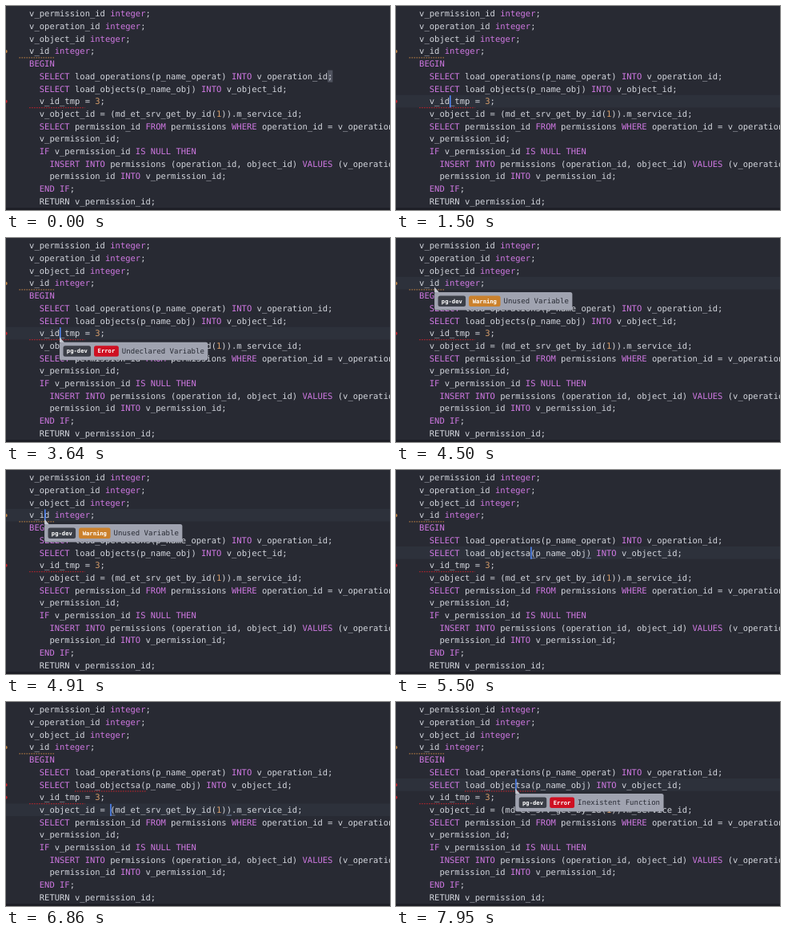
Animation of 480 by 256 pixels, one loop 8 s. Source, as an HTML page:

```html
<!DOCTYPE html>
<html lang="en">
<head>
<meta charset="utf-8">
<title>SQL linter</title>
<style>
html, body { margin: 0; width: 100%; height: 100%; overflow: hidden; background: #282a33; }
svg { display: block; width: 480px; height: 256px; }
text { font-family: "DejaVu Sans Mono", Menlo, monospace; text-rendering: geometricPrecision; }
.code { font-size: 10.5px; fill: #d3d6dd; }
.code .kw { fill: #cf78e2; }
.code .num { fill: #d69d69; }
.badge { font-size: 7.2px; font-weight: bold; fill: #fff; }
.message { font-size: 9px; fill: #292c35; }
.squiggle { fill: none; stroke-width: 1; stroke-dasharray: 1.6 1.4; }
</style>
</head>
<body>
<svg viewBox="0 0 480 256" xmlns="http://www.w3.org/2000/svg">
  <rect width="480" height="256" fill="#282a33"/>
  <rect id="activeLine" width="480" height="15.7" fill="#2d313b"/>
  <rect id="selection" width="6.3" height="15" fill="#50535f"/>
  <g id="code"></g>
  <g id="marks"></g>
  <path id="brackets" stroke="#6f7f9f" stroke-width="1"/>
  <rect id="caret" width="1.5" height="15.2" fill="#528bff"/>
  <rect y="253.3" width="480" height="2.7" fill="#1d1e25"/>
  <g id="bubbles"></g>
</svg>
<script>
const LOOP = 8000, LEFT = 29.1, CHAR = 6.321, PITCH = 15.7, TOP = 1.8;
const RED = '#c8232c', ORANGE = '#c48644';
const TYPED_AT = 5350, LINTED_AT = 6720;

const lines = [
  'v_permission_id integer;',
  'v_operation_id integer;',
  'v_object_id integer;',
  'v_id integer;',
  'BEGIN',
  '  SELECT load_operations(p_name_operat) INTO v_operation_id;',
  '  SELECT load_objects(p_name_obj) INTO v_object_id;',
  '  v_id_tmp = 3;',
  '  v_object_id = (md_et_srv_get_by_id(1)).m_service_id;',
  '  SELECT permission_id FROM permissions WHERE operation_id = v_operation_id',
  '  v_permission_id;',
  '  IF v_permission_id IS NULL THEN',
  '    INSERT INTO permissions (operation_id, object_id) VALUES (v_operation_id',
  '    permission_id INTO v_permission_id;',
  '  END IF;',
  '  RETURN v_permission_id;'
];

// Caret stops: start time, row, column, matching bracket columns
const stops = [
  { at: -500, row: 5, col: 60, selected: true },
  { at: 1200, row: 7, col: 6 },
  { at: 3800, row: 3, col: 3 },
  { at: 5150, row: 6, col: 21, pair: [21, 32] },
  { at: TYPED_AT, row: 6, col: 22, pair: [22, 33] },
  { at: 6500, row: 8, col: 16, pair: [16, 39] },
  { at: 7500, row: 6, col: 19 }
];

const bubbles = [
  { from: 2800, to: 3800, row: 7, col: 6, level: 'Error', text: 'Undeclared Variable' },
  { from: 4050, to: 5150, row: 3, col: 3, level: 'Warning', text: 'Unused Variable' },
  { from: 7580, to: LOOP, row: 6, col: 19, level: 'Error', text: 'Inexistent Function' }
];

const $ = id => document.getElementById(id);
const xOf = col => LEFT + col * CHAR;
const yOf = row => TOP + row * PITCH;
const show = (el, on) => el.setAttribute('visibility', on ? 'visible' : 'hidden');
const place = (el, x, y) => { el.setAttribute('x', x); el.setAttribute('y', y); };

const keywords = /\b(integer|BEGIN|SELECT|INTO|FROM|WHERE|IF|IS|NULL|THEN|INSERT|VALUES|END)\b/g;
const paint = source => source.trim()
  .replace(/\b\d+\b/g, '<tspan class="num">$&</tspan>')
  .replace(keywords, '<tspan class="kw">$&</tspan>');

$('code').innerHTML = lines.map((line, row) =>
  `<text class="code" x="${xOf(line.search(/\S/))}" y="${yOf(row) + 11.5}">${paint(line)}</text>`).join('');
const callLine = $('code').children[6];
const callBefore = paint(lines[6]);
const callAfter = paint(lines[6].replace('objects', 'objectsa'));

function mark(row, from, to, color) {
  const y = yOf(row) + 16;
  return `<g><circle cx="-.3" cy="${yOf(row) + 8.1}" r="2" fill="${color}"/>
    <path class="squiggle" stroke="${color}" d="M${xOf(from)} ${y}H${xOf(to)}"/></g>`;
}
$('marks').innerHTML = mark(3, -2, 5, ORANGE) + mark(7, 0, 11, RED) + mark(6, 9, 23, RED);
const callMark = $('marks').lastElementChild;

function bubble({ row, col, level, text }) {
  const levelWidth = level.length * 4.33 + 9.2;
  const textX = 43 + levelWidth + 4;
  const width = textX + text.length * 5.42 + 4.5;
  const color = level === 'Error' ? '#cf1022' : '#cb812c';
  return `<g transform="translate(${xOf(col)} ${yOf(row) + 19})">
    <path d="M0 -6.5L6 .5H0Z" fill="#c4c7d0"/>
    <rect width="${width}" height="22.5" rx="2.5" fill="#a0a3b0"/>
    <rect x="4.5" y="4.5" width="34.5" height="13.6" rx="2.5" fill="#3b3e47"/>
    <text class="badge" x="8.8" y="13.8">pg-dev</text>
    <rect x="43" y="4.5" width="${levelWidth}" height="13.6" rx="2.5" fill="${color}"/>
    <text class="badge" x="47.6" y="13.8">${level}</text>
    <text class="message" x="${textX}" y="14.4">${text}</text></g>`;
}
$('bubbles').innerHTML = bubbles.map(bubble).join('');

let typed = null;
function draw(now) {
  const t = now % LOOP;
  const stop = stops.filter(s => s.at <= t).pop();
  const x = xOf(stop.col), y = yOf(stop.row);

  place($('activeLine'), 0, y);
  show($('activeLine'), !stop.selected);
  place($('selection'), x - CHAR, y + .3);
  show($('selection'), stop.selected);
  place($('caret'), x, y + .5);
  show($('caret'), (t - stop.at) % 1000 < 500);
  $('brackets').setAttribute('d', (stop.pair || [])
    .map(col => `M${xOf(col)} ${y + 14.7}h${CHAR}`).join(''));

  if (typed !== (t >= TYPED_AT)) {
    typed = t >= TYPED_AT;
    callLine.innerHTML = typed ? callAfter : callBefore;
  }
  show(callMark, t >= LINTED_AT);
  bubbles.forEach((b, i) => show($('bubbles').children[i], t >= b.from && t < b.to));
  requestAnimationFrame(draw);
}
draw(0);
</script>
</body>
</html>
```
